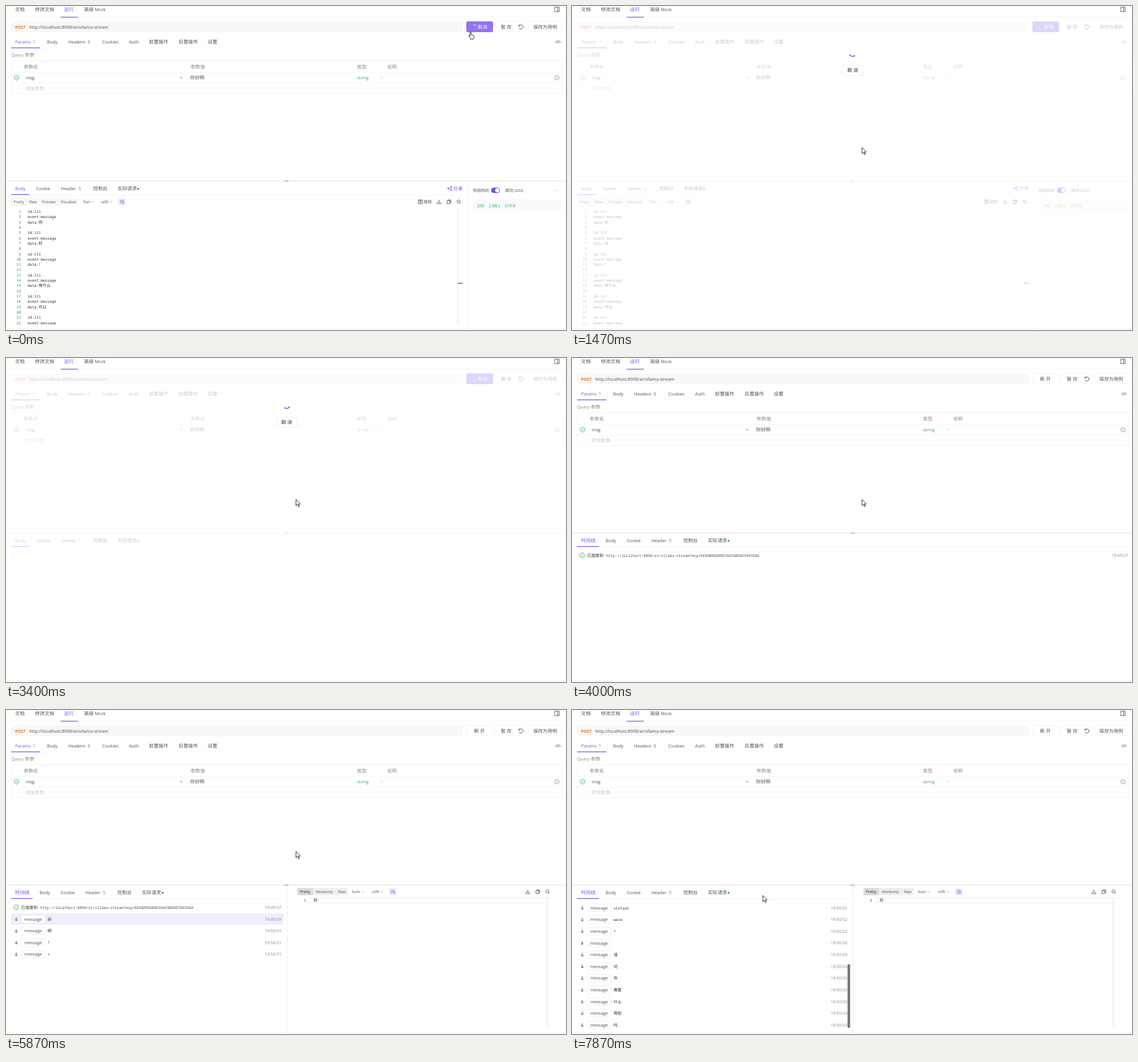
Animation, 983 px wide and 570 px high, one loop 8000 ms. Source, as an HTML page with a canvas:

```html
<!DOCTYPE html>
<html lang="zh-CN">
<head>
<meta charset="utf-8">
<style>
  html, body { margin: 0; width: 100%; height: 100%; overflow: hidden; background: #fff; }
  canvas { display: block; }
</style>
</head>
<body>
<canvas id="stage" width="983" height="570"></canvas>
<script>
const g = document.getElementById('stage').getContext('2d');
const LOOP = 8000, STEP = 200 / 3, ROW = 20.62;
const UI = '"Open Sans", "Noto Sans", sans-serif';
const MONO = '"Noto Sans Mono", "DejaVu Sans Mono", monospace';
const CJK = '"Noto Sans CJK SC", "Noto Sans CJK", sans-serif';
const INK = '#4c4f55', DARK = '#222', GREY = '#85878c', LINE = '#f0f0f1';
const PURPLE = '#7a4be6', GREEN = '#2fa866';

// [appears at ms, content, clock]
const MESSAGES = [
  [5130, '好', '49:59'], [5470, '啊', '50:01'], [5670, '！', '50:01'], [5870, '*', '50:01'],
  [6130, 'virtual', '50:02'], [6470, 'wave', '50:02'], [6730, '*', '50:02'], [6930, '', '50:03'],
  [7270, '请', '50:03'], [7350, '问', '50:03'], [7440, '你', '50:03'], [7530, '需要', '50:03'],
  [7620, '什么', '50:03'], [7710, '帮助', '50:03'], [7800, '吗', '50:03']
];
const WORDS = ['你', '好', '！', '有什么', '可以', '帮'];

const ICON = {
  panel: 'M-4-4h8v8h-8zM1.5-4v8',
  undo: 'M-3.2-1.6A3.7 3.7 0 1 1-3.4 1.5M-3.7-4v2.6h2.6',
  code: 'M-2-2.2L-4 0l2 2.2M2-2.2L4 0 2 2.2M.8-2.8l-1.6 5.6',
  check: 'M4.2 0a4.2 4.2 0 1 1-8.4 0a4.2 4.2 0 1 1 8.4 0M-1.9 0l1.4 1.5 2.5-2.8',
  minus: 'M4 0a4 4 0 1 1-8 0a4 4 0 1 1 8 0M-2 0h4',
  chevron: 'M-2.6-1.4L0 1.4l2.6-2.8',
  share: 'M3-2.5L-2.5 0 3 2.5M4-2.7a1 1 0 1 1-2 0a1 1 0 1 1 2 0M4 2.7a1 1 0 1 1-2 0a1 1 0 1 1 2 0M-2 0a1 1 0 1 1-2 0a1 1 0 1 1 2 0',
  wrap: 'M-3.5-2.5h7M-3.5 0h6q1.3 0 1.3 1.2T2.5 2.5H.8M-3.5 2.5h2.3M2 1.3L.7 2.5 2 3.7',
  extract: 'M-3.4-3.4h6.8v6.8h-6.8zM0-2v3.5M-1.5.2L0 1.7 1.5.2M-1.8-1.8h3.6',
  download: 'M0-3.5v4.6M-1.8-.6L0 1.2 1.8-.6M-3.5 1v2.3h7V1',
  copy: 'M-3.3-1.8h5v5h-5zM-1.6-1.8v-1.5h5v5H1.8',
  search: 'M2.2-.5a2.7 2.7 0 1 1-5.4 0a2.7 2.7 0 1 1 5.4 0M1.5 1.5L3.5 3.5',
  down: 'M0-3v6M-2.4.7L0 3 2.4.7',
  arrow: 'M0 0v10.8l2.5-2.3 1.9 4 1.6-.7-1.8-3.8h3.4z',
  hand: 'M-1 7.5V1a1 1 0 0 1 2 0v4l4 .8q1 .3 1 1.3v2q0 1.2-.8 2.1v1.3H-.2v-1.3q-2-2-3-4.2q.3-1.2 1.5-.3z'
};

const clamp = v => Math.max(0, Math.min(1, v));
const ease = v => v * v * (3 - 2 * v);

function text(s, x, y, color = INK, size = 7.73, family = UI, weight = 400) {
  g.fillStyle = color;
  for (const run of s.match(/[\u3000-\uffef]+|[^\u3000-\uffef]+/g) || []) {
    const wide = run[0] > '\u2fff';
    g.font = `${weight} ${wide ? size * 1.087 : size}px ${wide ? CJK : family}`;
    g.fillText(run, x, y + size * .38);
    x += g.measureText(run).width;
  }
}
const mono = (s, x, y, color = DARK) => text(s, x, y, color, 6.42, MONO);

function rect(x, y, w, h, fill) {
  g.fillStyle = fill;
  g.fillRect(x, y, w, h);
}
function box(x, y, w, h, fill, stroke, r = 3) {
  g.beginPath();
  g.roundRect(x, y, w, h, r);
  if (fill) { g.fillStyle = fill; g.fill(); }
  if (stroke) { g.strokeStyle = stroke; g.lineWidth = 1; g.stroke(); }
}
function icon(name, x, y, color = INK, width = .9, fill) {
  const path = new Path2D(ICON[name]);
  g.save();
  g.translate(x, y);
  if (fill) { g.fillStyle = fill; g.fill(path); }
  g.strokeStyle = color;
  g.lineWidth = width;
  g.lineJoin = 'round';
  g.stroke(path);
  g.restore();
}
function dot(x, y, r, color) {
  g.fillStyle = color;
  g.beginPath();
  g.arc(x, y, r, 0, 7);
  g.fill();
}
function spinner(x, y, r, width, color, t) {
  const mid = (150 + (t - 600) * .36) * Math.PI / 180;
  g.strokeStyle = color;
  g.lineWidth = width;
  g.lineCap = 'round';
  g.beginPath();
  g.arc(x, y, r, mid - .85, mid + .85);
  g.stroke();
  g.lineCap = 'butt';
}
const tabs = (y, list) => list.forEach(([s, x, color]) => text(s, x, y, color));

function drawRequest(t, spin) {
  tabs(6.5, [['文档', 16], ['修改文档', 51], ['运行', 102, PURPLE], ['高级 Mock', 137]]);
  rect(0, 19, 983, 1, '#f5f5f6');
  rect(96, 19, 30, 1.2, PURPLE);
  icon('panel', 967, 6, INK);

  box(9, 27, 793, 19, '#f7f7f8');
  text('POST', 16, 37, '#ef6820', 7.05, UI, 700);
  text('http://localhost:8098/ai/ollama-stream', 41, 36.7);
  if (t < 3600) {
    box(808, 27, 47, 19, '#9373ee');
    spinner(822, 36.7, 3.7, .9, '#fff', spin);
    text('取消', 828, 36.7, '#fff');
  } else {
    box(808.5, 27.5, 46, 18, '#fff', LINE);
    text('断 开', 821.5, 36.7);
  }
  box(859.5, 27.5, 53, 18, null, '#f5f5f6');
  text('暂 存', 868.5, 36.7);
  icon('undo', 904, 36.7, INK, 1);
  box(917.5, 27.5, 58, 18, null, '#f5f5f6');
  text('保存为用例', 925.5, 36.7);

  tabs(63, [['Params', 16, PURPLE], ['1', 46.7, GREEN], ['Body', 72], ['Headers', 109], ['8', 143.3, GREEN],
    ['Cookies', 169], ['Auth', 216], ['前置操作', 251], ['后置操作', 303], ['设置', 354]]);
  icon('code', 969, 63);
  rect(9, 73.5, 967, 1, '#f4f4f5');
  rect(9, 73, 51, 1.2, PURPLE);

  text('Query 参数', 9, 86, GREY);
  box(9.5, 96.5, 967, 58, null, '#f4f4f5', 2);
  rect(9, 116, 967, 1, '#f4f4f5');
  rect(9, 135, 967, 1, '#f4f4f5');
  tabs(107, [['参数名', 31, GREY], ['参数值', 324, GREY], ['类型', 616, GREY], ['说明', 669, GREY]]);
  icon('check', 18.5, 126, GREEN);
  tabs(126, [['msg', 35], ['=', 305.5], ['你好啊', 323], ['string', 616, GREEN]]);
  icon('chevron', 659, 126, '#bbb', .8);
  icon('minus', 967, 126, GREY, .8);
  text('添加参数', 34, 145, '#c4c5c8');

  rect(0, 307, 983, 2, '#eeeeef');
  [-2.3, 0, 2.3].forEach(d => dot(492.5 + d, 308, .7, '#555'));
  rect(0, 567, 983, 1, LINE);
}

function editorTools(y, right) {
  ['download', 'copy', 'search'].forEach((name, i) => icon(name, right - 35 + i * 17.5, y, INK, .9));
}
function wrapButton(x, y) {
  box(x - 6.5, y - 6.5, 13, 13, '#f1ebfd', null, 2);
  icon('wrap', x, y, PURPLE, .8);
}
const small = (y, list) => list.forEach(([s, x, color]) => text(s, x, y, color, 6.65));

function drawResponse(t) {
  tabs(321.3, [['Body', 16, PURPLE], ['Cookie', 53], ['Header', 96.5], ['5', 127.3, GREEN],
    ['控制台', 153], ['实际请求', 196]]);
  dot(231.8, 321.5, 1.8, GREEN);
  rect(9, 332, 793, 1, '#f4f4f5');
  rect(9, 331, 32, 1.2, PURPLE);
  if (t >= 3400) return;

  icon('share', 779, 321, PURPLE);
  text('分享', 785, 321.3, PURPLE);
  box(9, 338, 118, 13, '#f7f7f8', null, 2);
  box(9.5, 338.5, 26.5, 12, '#fbfbfb', '#e6e6e8', 2);
  small(344.5, [['Pretty', 13.5], ['Raw', 41], ['Preview', 63], ['Visualize', 96.3], ['Text', 135], ['utf8', 166.7],
    ['提取', 733]]);
  icon('chevron', 152, 344.5, '#aaa', .7);
  icon('chevron', 184, 344.5, '#aaa', .7);
  wrapButton(203.5, 344.5);
  icon('extract', 727.5, 344.5);
  editorTools(344.5, 795);

  g.save();
  g.beginPath();
  g.rect(0, 355, 811, 205);
  g.clip();
  for (let i = 0; i < 22; i++) {
    const y = 361.6 + i * 9.31, n = String(i + 1);
    mono(n, 26 - n.length * 3.85, y, '#237893');
    mono(['id:111', 'event:message', 'data:' + WORDS[i >> 2], ''][i % 4], 38, y);
  }
  g.restore();
  rect(793, 357, 1, 203, '#e6e6e6');
  rect(793, 487, 9, 1.2, '#444');

  rect(811, 309, 1, 258, '#f3f3f4');
  text('校验响应', 820, 324.3, INK, 6.5);
  box(851.5, 319.5, 15.5, 9.4, PURPLE, null, 4.7);
  dot(862.3, 324.2, 3.6, '#fff');
  text('成功 (200)', 876, 324.3, INK, 6.7);
  icon('chevron', 966.5, 324.3, '#bbb', .8);
  box(820, 340, 156, 21, '#f8f9fa');
  [['200', 827], ['2.88 s', 847.5], ['319 B', 875]].forEach(([s, x]) => text(s, x, 351, GREEN, 7.4));
}

function drawTimeline(t) {
  const shown = MESSAGES.filter(m => t >= m[0]);
  const split = shown.length > 0;
  const scroll = Math.max(0, (shown.length - 10) * ROW - .7);
  tabs(321.3, [['时间线', 16, PURPLE], ['Body', 59], ['Cookie', 96], ['Header', 139.3], ['5', 170.3, GREEN],
    ['控制台', 195.5], ['实际请求', 238.7]]);
  dot(274.8, 321.5, 1.8, GREEN);
  rect(9, 332, split ? 479 : 967, 1, '#f4f4f5');
  rect(9, 331, 38, 1.2, PURPLE);

  g.save();
  g.beginPath();
  g.rect(0, 337, 983, 228);
  g.clip();
  g.translate(0, 347.1 - scroll);
  icon('check', 18, 0, GREEN);
  text('已连接到', 26.5, 0, DARK, 6.6);
  mono('http://localhost:8098/ai/ollama-stream?msg=%E4%BD%A0%E5%A5%BD%E5%95%8A', 60, .5, INK);
  text('19:49:57', split ? 454 : 947, 0, GREY, 7.35);
  shown.forEach(([, content, clock], i) => {
    const y = (i + 1) * ROW;
    if (!i) box(9, y - 10, 479, 20, '#f1edfd', null, 2);
    icon('down', 18, y, INK, 1);
    box(27, y - 6.7, 41.5, 13.4, '#fff', '#efeff1', 2);
    text('message', 32, y, INK, 7.55);
    mono(content, 73, y + .5);
    text('19:' + clock, 454, y, GREY, 7.35);
  });
  g.restore();
  if (scroll) {
    const length = 223 - scroll * 1.083;
    box(483.7, 559.3 - length, 4.5, length, '#737373', null, 2);
  }
  if (split) drawDetail();
}

function drawDetail() {
  rect(493, 309, 1, 258, LINE);
  box(511.5, 313, 88.5, 13, '#efeff0', null, 2);
  box(511.5, 313, 27.5, 13, '#dcdcde', null, 2);
  small(319.7, [['Pretty', 516, DARK], ['Hexdump', 543.3], ['Raw', 583], ['Auto', 607], ['utf8', 642]]);
  icon('chevron', 627, 319.7, '#aaa', .7);
  icon('chevron', 659, 319.7, '#aaa', .7);
  wrapButton(679, 319.7);
  editorTools(319.7, 951);
  rect(531, 330, 426, 1, '#eee');
  rect(531, 338.5, 426, 1, '#eee');
  mono('1', 523, 334.7, '#0b216f');
  mono('好', 540, 334.5);
  rect(949.5, 330, 1, 226, '#dedede');
}

function drawOverlay(alpha, spin) {
  if (!alpha) return;
  g.globalAlpha = alpha;
  rect(0, 21, 983, 546, 'rgba(255,255,255,.7)');
  spinner(492.6, 82.3, 6.3, 1.4, '#6440d8', spin);
  box(474.5, 104.5, 36.5, 18, '#fff', '#efeff1');
  text('取 消', 483.3, 113.5, DARK);
  g.globalAlpha = 1;
}

function drawCursor(t, step) {
  const arrive = ease(clamp((step - 60) / 470));
  const leave = ease(clamp((step - 7330) / 530));
  const x = 815.5 - 306.5 * arrive - 174 * leave;
  const y = 45.7 + 203.3 * arrive + 77.3 * leave;
  icon(t < 1130 ? 'hand' : 'arrow', x, y, '#111', .9, '#fff');
}

function frame(now) {
  const t = now % LOOP;
  const step = Math.floor((t + 4) / STEP) * STEP;
  const spin = Math.min(step, 3400);
  rect(0, 0, 983, 570, '#fff');
  drawRequest(t, spin);
  if (t < 3600) drawResponse(t);
  else drawTimeline(t);
  drawOverlay(clamp((step - 70) / 260) * (1 - clamp((step - 3800) / 200)), spin);
  drawCursor(t, step);
}

const start = performance.now();
g.textRendering = 'geometricPrecision';
(function tick() {
  frame(performance.now() - start);
  requestAnimationFrame(tick);
})();
</script>
</body>
</html>
```
